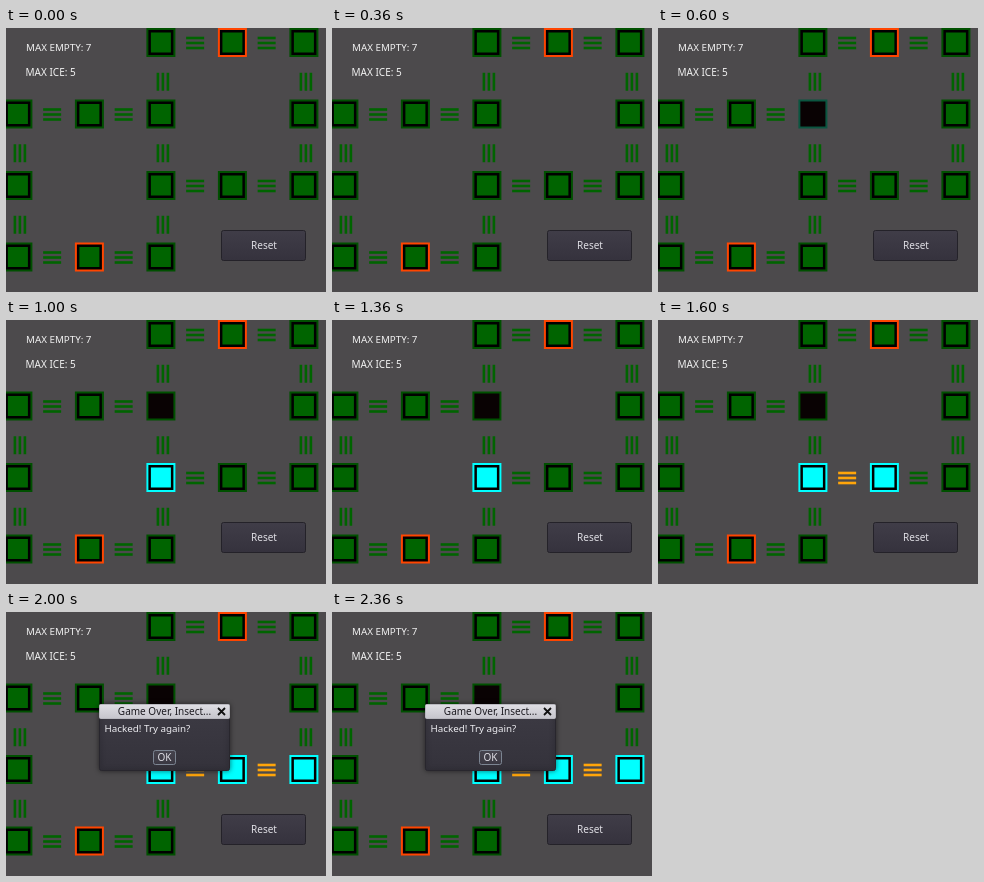
Recreate the animation shown at these times as an HTML page with a canvas. Size 320 by 264 pixels, loop 2600 ms.

```html
<!DOCTYPE html>
<html lang="en">
<head>
<meta charset="utf-8">
<title>Hacking grid</title>
<style>
  html, body { margin: 0; width: 100%; height: 100%; overflow: hidden; background: #4c4a4c; }
  canvas { display: block; }
</style>
</head>
<body>
<canvas id="stage" width="320" height="264"></canvas>
<script>
const ctx = document.getElementById('stage').getContext('2d');
const LOOP = 2600;
const EMPTY_AT = 600, HACK_AT = [1000, 1600, 2000];
const GREEN = '#006400', CYAN = '#00ffff', ORANGE = '#ffa50a', RED = '#ff4500';

const colX = c => 11.9 + 71.5 * c;
const rowY = r => 14.5 + 71.5 * r;

// Columns occupied in each row, and the links between neighbours
const nodes = [[2, 3, 4], [0, 1, 2, 4], [0, 2, 3, 4], [0, 1, 2]];
const acrossLinks = [[2, 3], [0, 1], [2, 3], [0, 1]];
const downLinks = [[2, 4], [0, 2, 4], [0, 2]];

function square(x, y, size, color) {
  ctx.fillStyle = color;
  ctx.fillRect(x - size / 2, y - size / 2, size, size);
}

function drawNode(col, row, time) {
  const x = colX(col), y = rowY(row);
  const empty = row === 1 && col === 2 && time >= EMPTY_AT;
  const hacked = row === 2 && col >= 2 && time >= HACK_AT[col - 2];
  const special = (row === 0 && col === 3) || (row === 3 && col === 1);
  const edge = hacked ? CYAN : special ? RED
    : empty && time < HACK_AT[0] ? '#0b5540' : '#005000';
  square(x, y, 29, edge);
  square(x, y, 25, empty ? '#090203' : '#000');
  if (!empty) square(x, y, 20, hacked ? CYAN : GREEN);
}

function drawLink(x, y, vertical, color) {
  ctx.fillStyle = color;
  for (const offset of [-5, 0, 5]) {
    if (vertical) ctx.fillRect(x + offset - 1.3, y - 9, 2.6, 18);
    else ctx.fillRect(x - 9, y + offset - 1.3, 18, 2.6);
  }
}

function text(str, x, y, color = '#f2f2f2', align = 'left', size = 10) {
  ctx.font = `${size}px "Noto Sans", sans-serif`;
  ctx.textAlign = align;
  ctx.fillStyle = color;
  ctx.fillText(str, x, y);
}

function panel(x, y, w, h, top, bottom, edge, radius = 2) {
  const fill = ctx.createLinearGradient(0, y, 0, y + h);
  fill.addColorStop(0, top);
  fill.addColorStop(1, bottom);
  ctx.beginPath();
  ctx.roundRect(x + 0.5, y + 0.5, w - 1, h - 1, radius);
  ctx.fillStyle = fill;
  ctx.fill();
  ctx.strokeStyle = edge;
  ctx.lineWidth = 1;
  ctx.stroke();
}

function drawDialog() {
  ctx.save();
  ctx.shadowColor = 'rgba(0, 0, 0, 0.5)';
  ctx.shadowBlur = 5;
  panel(93, 92, 131, 67, '#3d3b44', '#34323b', '#28262d');
  ctx.restore();
  panel(93, 92, 131, 15, '#e0dfe5', '#c5c4cb', '#b9b8bf', 1);
  text('Game Over, Insect...', 158.5, 102.5, '#1c1a20', 'center');
  ctx.beginPath();
  ctx.moveTo(212, 96);
  ctx.lineTo(219, 103);
  ctx.moveTo(219, 96);
  ctx.lineTo(212, 103);
  ctx.strokeStyle = '#111';
  ctx.lineWidth = 1.8;
  ctx.stroke();
  text('Hacked! Try again?', 98.5, 120, '#eeeef2', 'left', 9.8);
  panel(147, 138, 23, 15, '#45434d', '#3a3842', '#7c8592');
  text('OK', 158.5, 149, '#dedde4', 'center');
}

function draw(now) {
  const time = now % LOOP;
  ctx.fillStyle = '#4c4a4c';
  ctx.fillRect(0, 0, 320, 264);

  acrossLinks.forEach((cols, row) => cols.forEach(col => {
    const hacked = row === 2 && time >= HACK_AT[col - 1];
    drawLink(colX(col + 0.5) - 1.5, rowY(row) + 0.5, false, hacked ? ORANGE : GREEN);
  }));
  downLinks.forEach((cols, row) => cols.forEach(col =>
    drawLink(colX(col) + 2, rowY(row + 0.5) + 3.5, true, GREEN)));
  nodes.forEach((cols, row) => cols.forEach(col => drawNode(col, row, time)));

  text('MAX EMPTY: 7', 20, 23, '#f2f2f2', 'left', 9.8);
  text('MAX ICE: 5', 19.5, 48, '#f2f2f2', 'left', 10);
  panel(215, 202, 85, 31, '#403d48', '#35323d', '#242229');
  text('Reset', 258, 220.5, '#e0dfe5', 'center');

  if (time >= HACK_AT[2]) drawDialog();
  requestAnimationFrame(draw);
}

requestAnimationFrame(draw);
</script>
</body>
</html>
```
